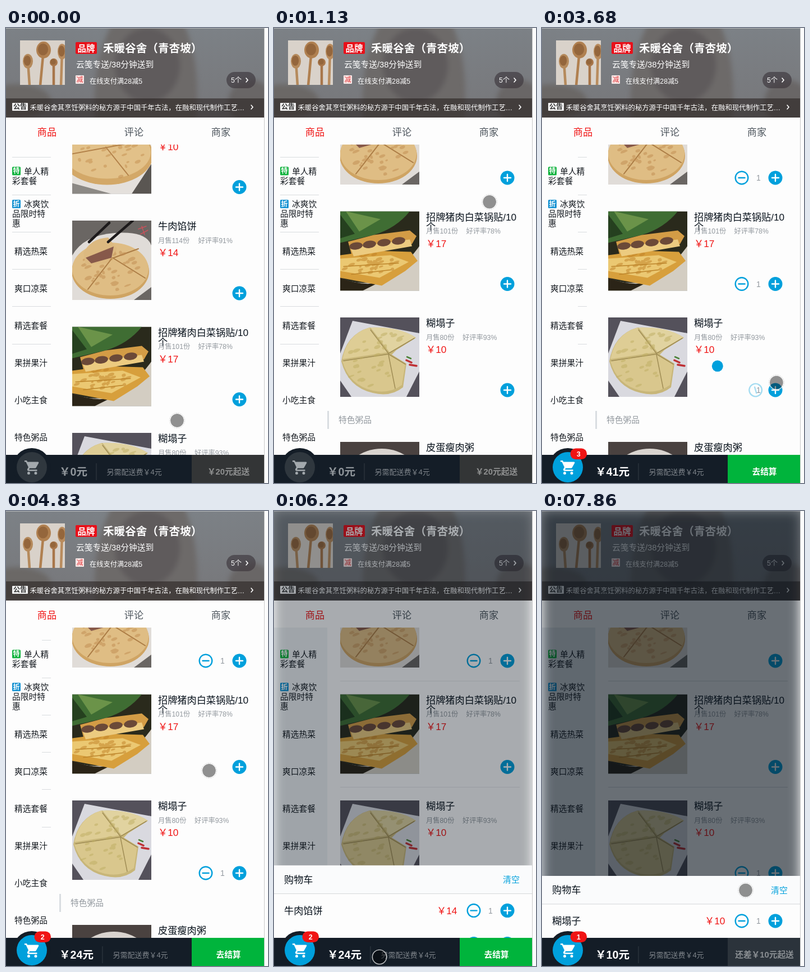
Animation, 467 px wide and 808 px high, one loop 8 s. Source, as an HTML page:

```html
<!DOCTYPE html>
<html lang="zh">
<head>
<meta charset="utf-8">
<style>
html, body { margin: 0; width: 100%; height: 100%; overflow: hidden; background: #fdfdfd; }
svg { display: block; font-family: "Liberation Sans", "Noto Sans CJK SC", "Noto Sans CJK", sans-serif; }
#mask { filter: blur(10px); }
#haze { filter: blur(4px); }
</style>
</head>
<body>
<svg id="stage" width="467" height="808" viewBox="0 0 467 808"></svg>
<script>
const LOOP = 8000, BLUE = '#00a0dc', RED = '#f01414', INK = '#07111b', GREY = '#93999f';
const SHOP = '禾暖谷舍';

// ---- drawing helpers: each returns SVG markup ----
const text = (x, cy, size, str, fill, extra = '') =>
  `<text x="${x}" y="${cy + size * .37}" font-size="${size}" fill="${fill}" ${extra}>${str}</text>`;
const rect = (x, y, w, h, fill, r = 0, extra = '') =>
  `<rect x="${x}" y="${y}" width="${w}" height="${h}" rx="${r}" fill="${fill}" ${extra}/>`;
const oval = (x, y, rx, ry, fill, turn = 0) =>
  `<ellipse cx="${x}" cy="${y}" rx="${rx}" ry="${ry}" fill="${fill}" transform="rotate(${turn} ${x} ${y})"/>`;
const path = (d, fill, extra = '') => `<path d="${d}" fill="${fill}" ${extra}/>`;
const line = (d, color, w) => path(d, 'none', `stroke="${color}" stroke-width="${w}" stroke-linecap="round"`);
const BOLD = 'font-weight="700"', LIGHT = 'font-weight="300"', MID = 'text-anchor="middle"';

// browned spots scattered over an ellipse
let seed = 7;
const random = () => (seed = seed * 16807 % 2147483647) / 2147483647;
const specks = (n, x, y, rx, ry, color) => `<g opacity=".5">` + Array.from({ length: n }, () => {
  const a = random() * 6.283, d = Math.sqrt(random());
  return oval(x + rx * d * Math.cos(a), y + ry * d * Math.sin(a), 2 + 5 * random(), 1.5 + 2 * random(), color, -20);
}).join('') + '</g>';

// ---- food pictures, 141 x 141 ----
const photos = {
  slices: rect(0, 0, 141, 141, '#5a5652') + path('M0 0H141V88L106 141H0Z', '#e4e0dc') + path('M0 122L70 141H0Z', '#8c8985') +
    oval(62, 72, 82, 53, '#d3a868') + oval(62, 67, 78, 47, '#e2c189') +
    line('M0 70L130 46M60 58L100 108', '#b3824a', 2) + specks(34, 62, 72, 66, 42, '#c48f50'),
  beef: rect(0, 0, 141, 141, '#6a6663') + path('M0 62Q20 26 76 22T141 44V118L110 141H0Z', '#e0dcd8') +
    oval(68, 90, 69, 49, '#cfa463') + oval(68, 86, 68, 47, '#dfbd84') +
    line('M72 66L130 102M70 68L28 122M74 66L118 50', '#ab7c45', 2) + specks(40, 66, 92, 58, 38, '#c18d51') +
    path('M20 58Q32 32 64 30L80 50 62 76 24 78Z', '#dcb980') + path('M24 66L74 46 70 66 34 76Z', '#87594a') +
    line('M30 38L66 4M64 38L108 0', '#1d1a1b', 4.5) + line('M118 15l14-5M122 24l13-7M124 10l5 15', '#c9525c', 1.5),
  dumplings: rect(0, 0, 141, 141, '#2a2a1c') + path('M0 0H124Q100 30 60 42L0 56Z', '#3f6d33') +
    path('M10 0L72 14 34 36Z', '#6b9349') + path('M0 6L26 40 0 48Z', '#25401f') +
    path('M0 118Q76 152 141 62V141H0Z', '#d3cdc2') + path('M0 118Q40 134 70 126L40 141H0Z', '#2b2417') +
    path('M0 78L60 70 126 72 138 88 116 106 74 132 0 118Z', '#d79f3c') +
    path('M0 84L90 78 122 90 70 118 0 106Z', '#ebc872') + specks(34, 54, 98, 52, 22, '#c08127') +
    path('M14 54L60 42 124 34 136 44 128 58 20 76Z', '#d39c46') + path('M18 64L124 50 128 62 24 80Z', '#eccb80') +
    [28, 52, 78, 104].map(x => oval(x, 65 - x * .12, 12, 6.5, '#6b4938', -8)).join('') +
    line('M6 98L104 92M20 112L90 104', '#bc842a', 1.5),
  pancake: rect(0, 0, 141, 141, '#54515b') + path('M22 6L141 28V96L118 141H20L0 112V64Z', '#d9d9df') +
    path('M2 78Q10 30 52 18Q104 16 135 36L100 58 92 66 118 82 112 124Q90 142 58 134Q14 124 2 78Z', '#c8b679') +
    path('M4 74Q12 30 52 18L84 62Z', '#decd95') + path('M54 18Q104 16 134 35L88 62Z', '#e1d3a0') +
    path('M4 78L86 66 116 82 110 120Q88 136 58 130 16 120 4 78Z', '#d9c78d') +
    line('M54 22L86 64 132 37M6 77L86 65 116 83M86 66L98 126', '#a08d55', 1.5) +
    specks(26, 54, 80, 44, 44, '#bfae63') + specks(6, 94, 36, 26, 10, '#bfae63') +
    line('M118 76l9 4M124 84l12 2', '#bf3034', 3.5) + line('M119 70l7 3', '#4b8238', 2.5),
  porridge: rect(0, 0, 141, 141, '#4a4240') + oval(74, 64, 66, 52, '#d9d4cf') + oval(74, 66, 56, 42, '#d0c3ac')
};

const foods = [
  { top: 153.5, pic: 'slices', price: 10 },
  { top: 342, pic: 'beef', name: '牛肉馅饼', sold: 114, rate: 91, price: 14, on: 1950, off: 7710 },
  { top: 530.5, pic: 'dumplings', name: '招牌猪肉白菜锅贴/10', more: '个', sold: 101, rate: 78, price: 17, on: 3010, off: 4680 },
  { top: 719, pic: 'pancake', name: '糊塌子', sold: 80, rate: 93, price: 10, on: 3575, off: 1e9 },
  { top: 940, pic: 'porridge', name: '皮蛋瘦肉粥', sold: 65, rate: 96, price: 12 }
];
const ordered = foods.filter(f => f.on);

function foodRow(f) {
  const y = f.top;
  return `<g transform="translate(118 ${y})"><svg width="141" height="141">${photos[f.pic]}</svg></g>` +
    (f.name ? text(271, y + 10, 17.17, f.name, INK, LIGHT) + text(271, y + 27, 17.17, f.more || '', INK, LIGHT) +
      text(271, y + 35, 12.27, `月售${f.sold}份`, GREY) +
      text(f.sold > 99 ? 342.5 : 336, y + 35, 12.27, `好评率${f.rate}%`, GREY) : '') +
    text(271, y + 57, 17.17, '￥' + f.price, RED);
}

function header() {
  const spoon = (x, y, rx, ry, c, foot) => line(`M${x} ${y}L${foot} 80`, c, 4.5) + oval(x, y, rx, ry, c) + oval(x - 1, y - 1, rx * .7, ry * .7, '#94663c');
  const thumb = rect(0, 0, 80, 80, '#d9d2ca') + spoon(14, 37, 9, 13, '#b58a5c', 17) + spoon(42, 17, 13, 15, '#b08050', 36) +
    spoon(60, 39, 7, 7, '#a8764a', 60) + spoon(75, 20, 8, 14, '#b98c5e', 73);
  const haze = `<g id="haze">${path('M158 170V118Q160 40 196 -20H310Q350 50 338 170Z', '#6d6a69')}` +
    oval(252, 66, 58, 66, '#5f5b5c') + oval(436, 132, 40, 40, '#696666') + oval(20, 130, 60, 30, '#6b6866') + '</g>';
  return `<svg width="460" height="159">${rect(0, 0, 460, 159, 'url(#sky)')}${haze}` +
    rect(0, 125, 460, 34, '#1c1512', 0, 'opacity=".5"') + rect(0, 0, 460, 1, '#b4b6b8') + '</svg>' +
    `<svg x="25" y="22" width="80" height="79">${thumb}</svg>` +
    rect(124, 25, 38, 21, '#e8101a', 2) + text(143, 36, 15.5, '品牌', '#fff', BOLD + MID) +
    text(173, 36, 19.6, SHOP + '（青杏坡）', '#fff', BOLD) +
    text(125, 65, 14.72, '云笺专送/38分钟送到', '#fff') +
    rect(124, 84, 15, 15, '#fbe9e8', 1) + text(131.5, 91.5, 12, '减', '#e0393c', MID) +
    text(149, 94, 12.27, '在线支付满28减5', '#fff') +
    rect(393, 78, 52, 29, '#3c363c', 14.5, 'opacity=".65"') + text(401, 92, 12.27, '5个', '#fff') +
    line('M428 89l3 3.5-3 3.5M437 137l3 3.5-3 3.5', '#fff', 1.6) +
    rect(11, 133, 28, 14, '#f4f4f4', 1) + text(25, 140, 12, '公告', '#333', BOLD + MID) +
    text(42.5, 141, 12.35, SHOP + '其烹饪粥料的秘方源于中国千年古法，在融和现代制作工艺…', '#fff');
}

function menu() {
  const icon = (y, str, color) => rect(11, y - 7.5, 15, 15, color, 1.5) + text(18.5, y, 12, str, '#fff', BOLD + MID);
  const label = (x, y, str) => text(x, y, 14.72, str, '#14191f');
  return rect(0, 207, 95, 551, '#e6eaee', 0, 'id="panel"') + path('', 'none', 'id="rules" stroke="#d9dcdf"') +
    icon(254, '特', '#12b33f') + label(32, 255, '单人精') + label(11, 272, '彩套餐') +
    icon(312.5, '折', '#1492d2') + label(32, 313, '冰爽饮') + label(11, 330, '品限时特') + label(11, 347, '惠') +
    ['精选热菜', '爽口凉菜', '精选套餐', '果拼果汁', '小吃主食', '特色粥品'].map((s, i) => label(15, 397 + 65.9 * i, s)).join('');
}

const stage = document.getElementById('stage');
stage.innerHTML = `
<defs>
  <linearGradient id="sky" x2="0" y2="1"><stop stop-color="#7c8186"/><stop offset="1" stop-color="#77777a"/></linearGradient>
  <clipPath id="view">${rect(95, 207, 365, 551, '#000')}</clipPath>
</defs>
${rect(0, 0, 467, 808, '#fdfdfd')}
${header()}
${text(73, 185, 17.17, '商品', RED, MID)}${text(228, 185, 17.17, '评论', '#4d555d', MID)}${text(383, 185, 17.17, '商家', '#4d555d', MID)}
${menu()}
<g clip-path="url(#view)"><g id="list">
  ${foods.map(foodRow).join('')}
  ${rect(95, 885, 3, 32, '#d9dde1')}${text(115, 901, 14.72, '特色粥品', GREY)}
  ${path('M118 507H438M118 695.5H438', 'none', 'id="seams" stroke="#d5d8dc"')}
  <g id="steppers"></g>
</g></g>
${rect(0, 0, 460, 808, 'rgba(7,17,27,.6)', 0, 'id="mask"')}
<g id="sheet"></g>
<g id="bar"></g>
${rect(460, 0, 7, 808, '#fdfdfd')}${rect(460, 0, 1, 808, '#c9c9c9')}
<circle id="ball" r="10" fill="${BLUE}"/>
<g id="cursor"><circle r="12" fill="#000" fill-opacity=".43"/><circle r="12.6" fill="none" stroke="#fff" stroke-opacity=".75" stroke-width="1.4"/>
<circle r="13.4" fill="none" stroke="#999" stroke-opacity=".6" stroke-width=".6" stroke-dasharray="3 1"/></g>`;
const $ = Object.fromEntries([...stage.querySelectorAll('[id]')].map(e => [e.id, e]));

// ---- motion ----
const ramp = (t, start, len) => Math.min(1, Math.max(0, (t - start) / len));
const easeInOut = p => p < .5 ? 2 * p * p : 1 - 2 * (1 - p) ** 2;
const inCart = (f, t) => t >= f.on && t < f.off;

// time, x, y
const trail = [[150, 305, 697], [430, 307, 547], [700, 307, 547], [850, 322, 480], [1130, 384, 309], [1420, 414, 268],
  [1700, 416, 265], [1950, 416, 265], [2340, 422, 382], [2860, 416, 454], [3150, 416, 454], [3500, 416, 642],
  [3575, 416, 642], [3680, 418, 630], [3950, 399, 519], [4100, 399, 519], [4400, 362, 461], [4900, 362, 461],
  [5660, 188, 792], [6600, 188, 792], [6890, 290, 720], [7440, 363, 673.5], [LOOP, 363, 673.5]];
function along(t) {
  const i = trail.findIndex(k => k[0] > t);
  if (i <= 0) return trail[0].slice(1);
  const a = trail[i - 1], b = trail[i], p = ramp(t, a[0], b[0] - a[0]);
  return [a[1] + (b[1] - a[1]) * p, a[2] + (b[2] - a[2]) * p];
}

function stepper(y, f, t) {
  const p = f.on ? Math.min(ramp(t, f.on, 180), 1 - ramp(t, f.off, 150)) : 0;
  const plus = `<circle cx="416" cy="${y}" r="12.5" fill="${BLUE}"/>` + line(`M410 ${y}h12M416 ${y - 6}v12`, '#fff', 2.4);
  const minus = `<g opacity="${p * p}" transform="translate(${416 - 60 * p} ${y}) rotate(${180 * (1 - p)})">` +
    `<circle r="11.3" fill="none" stroke="${BLUE}" stroke-width="2.4"/>${line('M-5.5 0h11', BLUE, 2.4)}</g>`;
  return (p ? minus : '') + plus + (inCart(f, t) ? text(386, y, 14, 1, GREY, MID) : '');
}

function bar(items) {
  const n = items.length, total = items.reduce((s, f) => s + f.price, 0), ready = total >= 20;
  const x = 161 + 10.9 * (String(total).length - 1), dim = 'rgba(255,255,255,.45)';
  const note = ready ? '去结算' : n ? `还差￥${20 - total}元起送` : '￥20元起送';
  return rect(0, 758, 460, 50, '#141d27') + rect(331, 758, 129, 50, ready ? '#00b43c' : n ? '#2b333b' : '#333536') +
    oval(46, 780, 34, 34, '#141d27') + oval(46, 780, 27, 27, n ? BLUE : '#2f373e') +
    `<g transform="translate(31.7 765.5) scale(1.25)">` +
    path('M7 18a2 2 0 100 4 2 2 0 000-4zM17 18a2 2 0 100 4 2 2 0 000-4zM1 2v2h2l3.6 7.6-1.4 2.4C4.5 15.4 5.5 17 7 17h12v-2H7.4l1-2h7.5c.7 0 1.4-.4 1.7-1l3.6-6.5c.3-.7-.1-1.5-.9-1.5H5.2L4.3 2z', n ? '#fff' : '#a3a9ad') + '</g>' +
    (n ? rect(50.5, 746.5, 29.5, 19.5, RED, 9.7) + text(65.2, 756, 12.5, n, '#fff', BOLD + MID) : '') +
    text(95, 788, 19.6, `￥${total}元`, n ? '#fff' : '#8f959a', BOLD) + rect(x - .5, 773, 1, 30, '#343c45') +
    text(x + 18.5, 788, 13, '另需配送费￥4元', '#7f858b') + text(396.5, 788, 14.72, note, ready ? '#fff' : dim, BOLD + MID);
}

function sheet(items, t) {
  const top = 758 - 51 - 59 * items.length;
  return rect(0, top, 460, 758 - top, '#fdfdfd') + rect(0, top, 460, 49, '#fafbfc') + rect(0, top + 49.5, 460, 1, '#d3d6d9') +
    text(18, top + 25, 17.17, '购物车', INK, LIGHT) + text(408, top + 25, 14.9, '清空', BLUE) +
    items.map((f, i) => {
      const y = top + 80 + 59 * i;
      return text(18, y, 17.17, f.name, INK, LIGHT) + text(290, y, 17.17, '￥' + f.price, RED) + stepper(y, f, t);
    }).join('');
}

function ball(t, scroll) {
  const f = ordered.find(f => t >= f.on && t < f.on + 380);
  $.ball.setAttribute('visibility', f ? 'visible' : 'hidden');
  if (!f) return;
  const p = ramp(t, f.on, 380), y = f.top + 129 - scroll, lift = 265;
  $.ball.setAttribute('cx', 416 - 370 * p);
  $.ball.setAttribute('cy', y - lift * p + (780 - y + lift) * p * p);
}

function draw(now) {
  const t = now % LOOP, items = ordered.filter(f => inCart(f, t));
  const scroll = 150 * ramp(t, 150, 280) + 55 * ramp(t, 700, 150);
  const open = easeInOut(ramp(t, 5940, 430)), shade = open * open;

  $.list.setAttribute('transform', `translate(0 ${-scroll})`);
  $.steppers.innerHTML = foods.map(f => stepper(f.top + 129, f, t)).join('');
  $.rules.setAttribute('d', t >= 5940 ? '' : [229, 296, 362, 428, 494, 561].map(y => `M${t < 1950 ? 11 : 64} ${y + .5}H80`).join(''));
  for (const id of ['mask', 'panel', 'seams']) $[id].setAttribute('opacity', shade);
  $.sheet.innerHTML = open ? sheet(items, t) : '';
  $.sheet.setAttribute('transform', `translate(0 ${(1 - open) * (51 + 59 * items.length)})`);
  $.bar.innerHTML = bar(items);
  ball(t, scroll);
  $.cursor.setAttribute('transform', `translate(${along(t)})`);
  requestAnimationFrame(draw);
}
requestAnimationFrame(draw);
</script>
</body>
</html>
```
